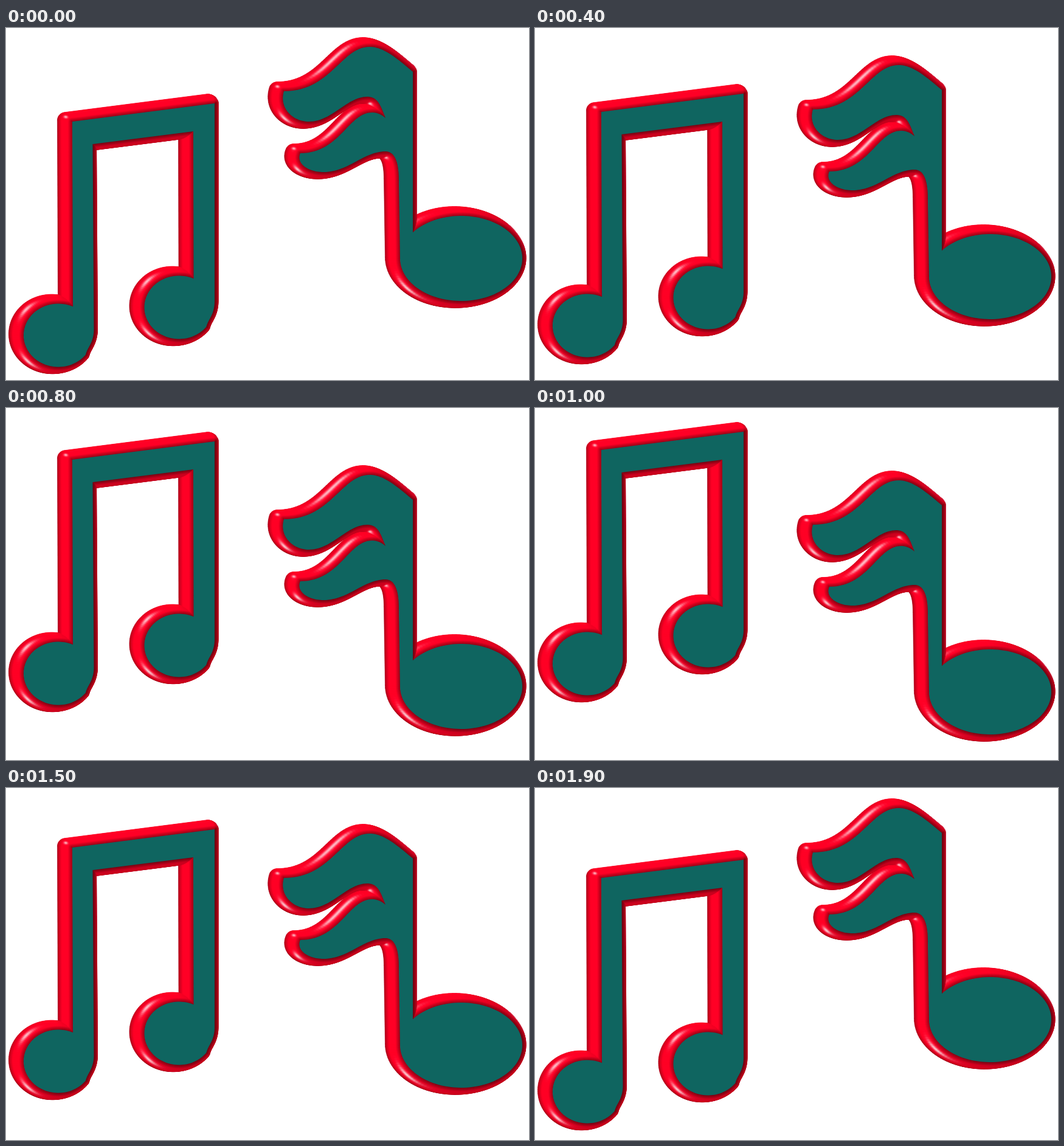
An HTML page with a canvas for the animation above (2000 ms loop, 860 by 579 pixels).

```html
<!DOCTYPE html>
<html lang="en">
<head>
<meta charset="utf-8">
<title>Bobbing notes</title>
<style>
html, body { margin: 0; width: 100%; height: 100%; overflow: hidden; background: #fff; }
canvas { display: block; }
</style>
</head>
<body>
<canvas id="stage" width="860" height="579"></canvas>
<script>
const W = 860, H = 579, LOOP = 2000, STEP = 100;
const TEAL = 'rgb(15,101,96)';
// Rounded bevel: its radius, and how far the face is shifted by the viewing angle
const BEVEL = 13.2, SHIFT_X = 11.4, SHIFT_Y = 2.2, LAYERS = 28;

const lerp = (a, b, t) => a + (b - a) * t;
const clamp = v => Math.max(0, Math.min(1, v));

// Collects a face outline, drawn counterclockwise on screen
class Outline {
  constructor(x, y) { this.pts = [[x, y]]; }

  get end() { return this.pts[this.pts.length - 1]; }

  line(x, y) {
    this.pts.push([x, y]);
    return this;
  }

  curve(x1, y1, x2, y2, x, y) {
    const [x0, y0] = this.end, n = 30;
    for (let i = 1; i <= n; i++) {
      const t = i / n, u = 1 - t;
      const at = (a, b, c, d) => u * u * u * a + 3 * u * u * t * b + 3 * u * t * t * c + t * t * t * d;
      this.line(at(x0, x1, x2, x), at(y0, y1, y2, y));
    }
    return this;
  }

  // S-curve that leaves and arrives level
  swell(x, y, out, into) {
    const [x0, y0] = this.end;
    return this.curve(lerp(x0, x, out), y0, lerp(x, x0, into), y, x, y);
  }

  arc(cx, cy, rx, ry, from, to) {
    const n = Math.ceil(Math.abs(to - from) / 3);
    for (let i = 0; i <= n; i++) {
      const a = lerp(from, to, i / n) * Math.PI / 180;
      this.line(cx + rx * Math.cos(a), cy + ry * Math.sin(a));
    }
    return this;
  }

  // Stem side, round head and the small kink back to the stem
  foot(x, y) {
    return this.arc(x, y, 57, 52, -65, -322)
      .curve(x + 48, y + 19, x + 58, y + 13, x + 58.5, y - 9);
  }

  // From the crest to a pointed tip, round the belly, then up to the hump
  flag(tip, belly, hump) {
    const dx = belly[0] - tip[0], dy = belly[1] - tip[1];
    return this.swell(...tip, 0.33, 0.55)
      .curve(tip[0] - 0.2 * dx, tip[1] + 0.55 * dy, tip[0] + 0.35 * dx, belly[1], ...belly)
      .swell(...hump, 0.4, 0.35);
  }
}

const beamed = new Outline(343, 124)
  .line(109, 154)
  .foot(86, 505.5)
  .line(142.5, 191)
  .line(308, 170)
  .foot(284.5, 459.5);

const flagged = new Outline(669, 72)
  .curve(645, 52, 622, 31, 598, 31)
  .flag([457, 104], [498, 154], [594, 113])
  .curve(612, 113, 616, 128, 624, 148)
  .curve(617, 142, 610, 139, 602, 139)
  .flag([484, 206], [522, 237], [624, 203])
  .curve(640, 203, 646, 222, 646, 250)
  .arc(748.5, 379, 100.5, 70, 180, -142.3);

// Splits the border into strips along edges and fans around convex corners
function patches(pts) {
  const edges = [];
  pts.forEach((a, i) => {
    const b = pts[(i + 1) % pts.length];
    const dx = b[0] - a[0], dy = b[1] - a[1];
    if (Math.hypot(dx, dy) > 0.01) edges.push({ a, b, angle: Math.atan2(dx, -dy) });
  });
  const list = [];
  edges.forEach((e, i) => {
    const next = edges[(i + 1) % edges.length];
    list.push({ a: e.a, b: e.b, from: e.angle, to: e.angle });
    const diff = next.angle - e.angle;
    const turn = Math.atan2(Math.sin(diff), Math.cos(diff));
    if (turn >= 0) return;
    const n = Math.ceil(-turn / 0.1);
    for (let k = 0; k < n; k++) {
      list.push({ a: e.b, b: e.b, from: e.angle + turn * k / n, to: e.angle + turn * (k + 1) / n });
    }
  });
  return list;
}

// Direction x, y, z, then strength and sharpness of each highlight
const lamps = [
  [-0.53, -0.53, 0.66, 0.8, 55],
  [-0.48, 0.53, 0.7, 0.75, 60],
  [0.7, -0.46, 0.55, 0.6, 45]
];

// Colour of the bevel with outward normal (nx, ny) at depth s, rim 0 to face 1
function shade(nx, ny, s) {
  const c = Math.cos(s * Math.PI / 2), z = Math.sin(s * Math.PI / 2);
  let glow = 0;
  for (const [x, y, lz, power, sharp] of lamps) {
    glow += power * Math.max(0, nx * c * x + ny * c * y + z * lz) ** sharp;
  }
  const away = clamp(Math.max(nx * 0.95, ny * 0.6 + nx * 0.4));
  const outer = 0.32 * clamp(1 - s / 0.3) * clamp(0.3 - nx * 0.7 + ny * 0.4);
  const inner = 0.42 * clamp((s - 0.68) / 0.32);
  const f = (1 - 0.32 * away) * (1 - outer) * (1 - inner);
  return `rgb(${[255, 0, 38].map(v => Math.round(lerp(v * f, 255, clamp(glow))))})`;
}

function polygon(g, pts) {
  g.beginPath();
  pts.forEach(p => g.lineTo(p[0], p[1]));
  g.closePath();
  g.fill();
}

function render({ pts }) {
  const sprite = document.createElement('canvas');
  sprite.width = W;
  sprite.height = H;
  const g = sprite.getContext('2d');
  const border = patches(pts);
  const out = (p, angle, d) => [p[0] + d * Math.cos(angle), p[1] + d * Math.sin(angle)];
  g.lineWidth = 0.5;
  g.lineJoin = 'round';
  // Lower, wider layers first, so that higher ones cover them
  for (let k = 0; k < LAYERS; k++) {
    const s = k / LAYERS, tilt = s * Math.PI / 2;
    const d = BEVEL * Math.cos(tilt), sink = 1 - Math.sin(tilt);
    g.setTransform(1, 0, 0, 1, -SHIFT_X * sink, -SHIFT_Y * sink);
    for (const { a, b, from, to } of border) {
      const mid = (from + to) / 2;
      g.fillStyle = g.strokeStyle = shade(Math.cos(mid), Math.sin(mid), s);
      polygon(g, [a, b, out(b, to, d), out(a, from, d)]);
      g.stroke();
    }
  }
  g.resetTransform();
  g.fillStyle = TEAL;
  polygon(g, pts);
  return sprite;
}

const ctx = document.getElementById('stage').getContext('2d');
const left = render(beamed), right = render(flagged);
const start = performance.now();

function draw(now) {
  const t = Math.floor(Math.max(0, now - start) % LOOP / STEP) * STEP;
  const a = t / LOOP * 2 * Math.PI, lag = Math.PI / 10;
  ctx.fillStyle = '#fff';
  ctx.fillRect(0, 0, W, H);
  ctx.drawImage(left, 0, Math.round(44.6 * (Math.cos(a - lag) - Math.cos(lag))));
  ctx.drawImage(right, 0, Math.round(44 * (1 - Math.cos(a - 0.01))));
  requestAnimationFrame(draw);
}
draw(start);
</script>
</body>
</html>
```
